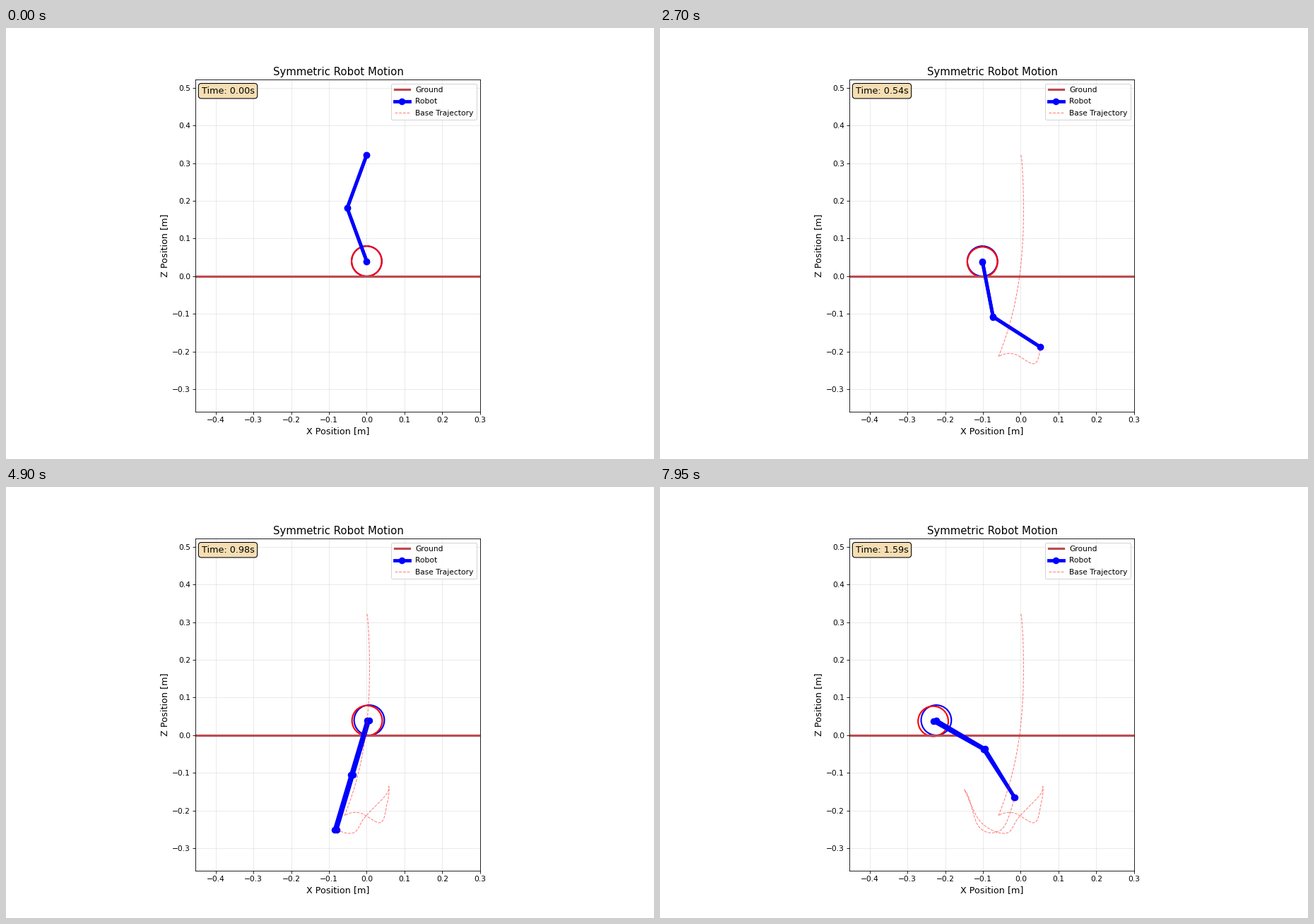
Animation of 917 by 611 pixels, one loop 8 s. Source, as a matplotlib script:

```python
import numpy as np
import matplotlib.pyplot as plt
from matplotlib.animation import FuncAnimation
from matplotlib.patches import Circle

W, H, DPI = 917, 611, 76.375
FRAMES, INTERVAL = 160, 50
RADIUS = 0.04                        # wheel radius [m]
SCALE, X0, Z0 = 534.4, 510.5, 351.9  # pixels per metre, origin on the stage
LINK = 0.15 * SCALE                  # leg segment length in pixels
AXLE_Y = Z0 - RADIUS * SCALE
FOLD, LAND = 25, 35                  # base level with the axle, first full stretch

# Steps at which the leg passes through straight and the knee changes side
STRETCHES = (35.2, 50.5, 70, 91, 102, 113.5, 134.5, 145, 153)

# Turning points of the swinging base: step, x, y
SWING = np.array([
    (35, 479, 466), (42, 501, 462), (49, 531, 475.5), (55, 539.5, 448),
    (66, 541.8, 424.5), (70, 541, 431), (85, 505, 472), (91, 493.5, 489.5),
    (102, 454, 475), (111, 433.5, 435), (117, 430.5, 429), (126, 437, 440),
    (135, 450.5, 480.5), (145, 475, 489.5), (153, 490.5, 475),
    (159, 501.7, 439.7),
])

# Wheel strokes: first step, last step, distance, easing
STROKES = (
    (23.5, 35, 54, lambda s: s ** 2),
    (35, 70, -147, lambda s: 1 - (1 - s) ** 1.7),
    (70, 114, 136.5, lambda s: (1 - np.cos(np.pi * s)) / 2),
    (114, 159, -163, lambda s: s ** 1.7),
)


def ramp(t, start, end):
    return np.clip((t - start) / (end - start), 0, 1)


def spline(t, k, v):
    """Cubic Hermite curve through values v at steps k."""
    slope = np.gradient(v, k, edge_order=2)
    i = np.clip(np.searchsorted(k, t, side="right") - 1, 0, len(k) - 2)
    h = k[i + 1] - k[i]
    s = (t - k[i]) / h
    return ((1 + 2 * s) * (1 - s) ** 2 * v[i] + s * (1 - s) ** 2 * h * slope[i]
            + s * s * (3 - 2 * s) * v[i + 1] + s * s * (s - 1) * h * slope[i + 1])


def base_path(t):
    """Free fall until the leg first stretches, then a swing."""
    fall_x = 510.5 + 0.27 * t - 38.2 * (t / 34) ** 6
    fall_y = 180 + 0.242 * t ** 2
    k, x, y = SWING.T
    falling = t < LAND
    return (np.where(falling, fall_x, spline(t, k, x))
            - 1j * np.where(falling, fall_y, spline(t, k, y)))


def wheel_path(t):
    x = X0 + sum(dist * ease(ramp(t, a, b)) for a, b, dist, ease in STROKES)
    return x - 1j * AXLE_Y


def knee_path(t, hip, wheel):
    """Two-link inverse kinematics, easing through each straight pose."""
    reach = wheel - hip
    dist = np.abs(reach)
    side = np.where(t < FOLD, 1, -1)
    for s in STRETCHES:
        side = side * np.tanh((t - s) / 1.5)
    bend = np.sqrt(np.clip(LINK ** 2 - dist ** 2 / 4, 0, None))
    return (hip + wheel) / 2 + 1j * reach / dist * bend * side


def to_metres(p):
    return (p.real - X0 + 1j * (p.imag + Z0)) / SCALE


def solve_legs():
    """Hip, knee and wheel of both legs for every step."""
    t = np.arange(FRAMES)
    hip, wheel = base_path(t), wheel_path(t)
    near = np.array([hip, knee_path(t, hip, wheel), wheel])
    # The far leg sags with the reach and slowly slips to the left.
    sag = -0.014j * np.abs((wheel - hip).real) * ramp(t, FOLD, LAND)
    hip_slip = -4 * np.sin(np.pi * ramp(t, 75, 160))
    wheel_slip = -4.3 * ramp(t, 68, 111)
    far = near + np.array([hip_slip, (hip_slip + wheel_slip + sag) / 2,
                           wheel_slip + sag])
    return to_metres(near), to_metres(far)


near, far = solve_legs()

fig, ax = plt.subplots(figsize=(W / DPI + 1e-9, H / DPI + 1e-9), dpi=DPI)
ax.set_xlim(-0.4527, 0.3013)
ax.set_ylim(-0.359, 0.5213)
ax.set_aspect("equal")
ax.grid(True, alpha=0.3)
ax.set_xlabel("X Position [m]", fontsize=12)
ax.set_ylabel("Z Position [m]", fontsize=12)
ax.set_title("Symmetric Robot Motion", fontsize=14)

ax.axhline(0, color="#be4b4f", lw=3, label="Ground")
leg_style = dict(color="blue", lw=4.5, marker="o", markersize=8)
near_line, = ax.plot([], [], label="Robot", **leg_style)
far_line, = ax.plot([], [], **leg_style)
trail, = ax.plot([], [], "r--", lw=1, alpha=0.5, label="Base Trajectory")
near_wheel, far_wheel = (
    ax.add_patch(Circle((0, RADIUS), RADIUS, fill=False, ec=c, lw=2))
    for c in ("blue", "red"))
clock = ax.text(0.02, 0.98, "", transform=ax.transAxes, fontsize=12, va="top",
                bbox=dict(boxstyle="round,pad=0.33", facecolor="wheat"))
ax.legend(loc="upper right", fontsize=10, labelspacing=0.59, borderpad=0.42)


def update(i):
    for leg, line, rim in ((near, near_line, near_wheel),
                           (far, far_line, far_wheel)):
        p = leg[:, i]
        line.set_data(p.real, p.imag)
        rim.center = p[2].real, p[2].imag
    path = near[0, :i + 1]
    trail.set_data(path.real, path.imag)
    clock.set_text(f"Time: {i / 100:.2f}s")
    return near_line, far_line, near_wheel, far_wheel, trail, clock


anim = FuncAnimation(fig, update, frames=FRAMES, interval=INTERVAL,
                     init_func=lambda: update(0), repeat=True, repeat_delay=0)
plt.show()
```
